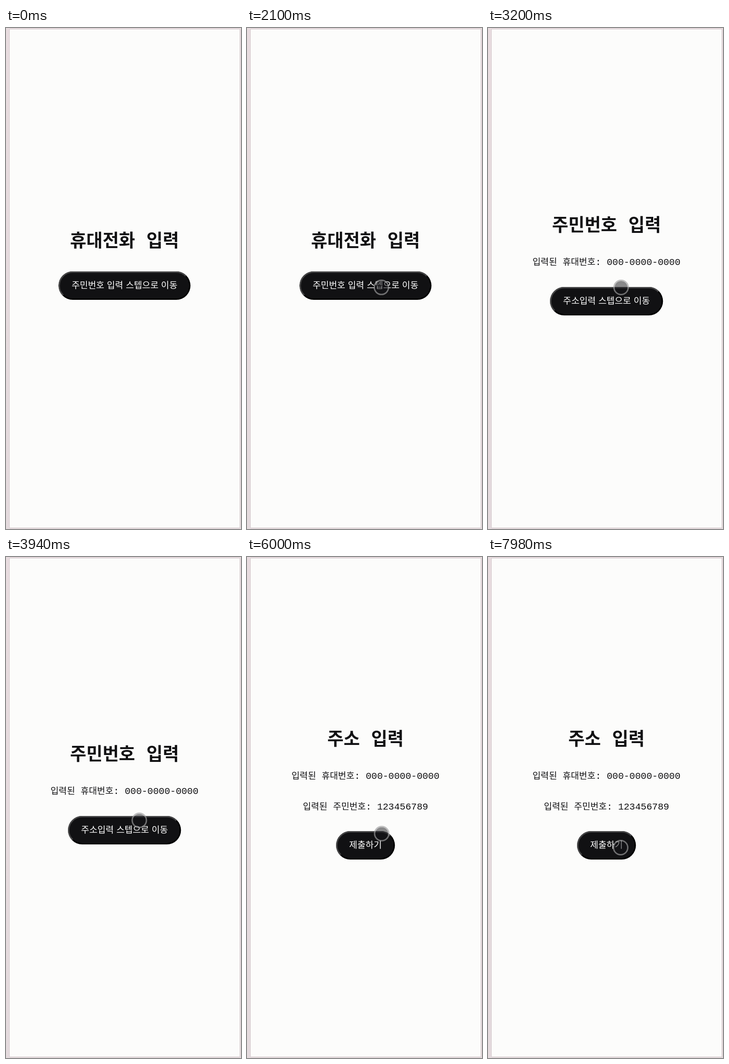
An HTML page with a canvas that plays this animation: 512x1093 px, repeating every 8000 ms.

```html
<!DOCTYPE html>
<html lang="ko">
<head>
<meta charset="utf-8">
<style>
  html, body { margin: 0; width: 100%; height: 100%; overflow: hidden; background: #e6dcde; }
  canvas { display: block; }
</style>
</head>
<body>
<canvas width="512" height="1093"></canvas>
<script>
const ctx = document.querySelector('canvas').getContext('2d');
const LOOP = 8000, CENTER = 258.2, INK = '#111113';
const HANGUL = '"Noto Sans CJK KR", "Noto Sans CJK", sans-serif';
const MONO = '"Liberation Mono", monospace';

const PHONE = ['입력된 휴대번호', ': 000-0000-0000'];
const RESIDENT = ['입력된 주민번호', ': 123456789'];
const PAGES = [
  { from: 0, title: '휴대전화 입력', lines: [], button: '주민번호 입력 스텝으로 이동' },
  { from: 3040, title: '주민번호 입력', lines: [PHONE], button: '주소입력 스텝으로 이동' },
  { from: 5560, title: '주소 입력', lines: [PHONE, RESIDENT], button: '제출하기' },
];

// Pointer stops: time, x, y
const PATH = [
  [1380, 532, 640], [2150, 290, 565], [3200, 290, 566], [3700, 290, 566],
  [4500, 292, 605], [5300, 292, 605], [6000, 293.5, 603.5], [6400, 293, 604],
  [7100, 289, 634], [8000, 289, 634],
];

// Draws runs of [text, font, wordSpacing] as one centred line
function centered(runs, y, color) {
  const setStyle = ([, font, gap]) => {
    ctx.font = font;
    ctx.wordSpacing = gap + 'px';
  };
  const widths = runs.map(run => {
    setStyle(run);
    return ctx.measureText(run[0]).width;
  });
  let x = CENTER - widths.reduce((a, b) => a + b) / 2;
  ctx.fillStyle = color;
  runs.forEach((run, i) => {
    setStyle(run);
    ctx.fillText(run[0], x, y);
    x += widths[i];
  });
}

function drawButton(label, top) {
  ctx.font = `19.35px ${HANGUL}`;
  ctx.wordSpacing = '1.3px';
  const w = ctx.measureText(label).width + 57, h = 62, x = CENTER - w / 2;
  ctx.fillStyle = '#000';
  ctx.beginPath();
  ctx.roundRect(x, top, w, h, h / 2);
  ctx.fill();
  ctx.fillStyle = INK;
  ctx.beginPath();
  ctx.roundRect(x + 3, top + 3, w - 6, h - 6, h / 2 - 3);
  ctx.fill();
  // Lit bevel along the left and top edges
  const r = h / 2 - 1.5, cy = top + h / 2;
  ctx.strokeStyle = '#454546';
  ctx.lineWidth = 3;
  ctx.beginPath();
  ctx.arc(x + h / 2, cy, r, Math.PI * 0.75, Math.PI * 1.5);
  ctx.arc(x + w - h / 2, cy, r, Math.PI * 1.5, Math.PI * 1.75);
  ctx.stroke();
  centered([[label, ctx.font, 1.3]], top + 37, '#fff');
}

function drawPage({ title, lines, button }) {
  const lift = 33.5 * lines.length;
  centered([[title, `700 38.5px ${HANGUL}`, 16]], 476.5 - lift, INK);
  lines.forEach(([label, value], i) => centered([
    [label, `19.35px ${HANGUL}`, 8],
    [value, `20.6px ${MONO}`, 0],
  ], 550.8 - lift + 67 * i, INK));
  drawButton(button, Math.round(531.2 + lift));
}

function drawPointer(t) {
  const i = PATH.findIndex(stop => stop[0] > t);
  if (i < 1) return;
  const [t0, x0, y0] = PATH[i - 1], [t1, x1, y1] = PATH[i];
  const p = (t - t0) / (t1 - t0), e = p * p * (3 - 2 * p);
  const x = x0 + (x1 - x0) * e, y = y0 + (y1 - y0) * e;
  ctx.beginPath();
  ctx.arc(x, y, 14, 0, Math.PI * 2);
  ctx.fillStyle = 'rgba(20,20,24,.5)';
  ctx.fill();
  ctx.beginPath();
  ctx.arc(x, y, 15.5, 0, Math.PI * 2);
  ctx.strokeStyle = 'rgba(160,160,162,.66)';
  ctx.lineWidth = 3;
  ctx.stroke();
}

function drawBackdrop() {
  const shade = ctx.createLinearGradient(0, 0, 0, 1093);
  shade.addColorStop(0, '#e8dcdf');
  shade.addColorStop(1, '#e4dadd');
  ctx.fillStyle = shade;
  ctx.fillRect(0, 0, 512, 1093);
  ctx.fillStyle = '#d3c8cc';
  ctx.fillRect(7, 2, 503, 1089);
  ctx.fillStyle = '#fcfcfb';
  ctx.fillRect(8, 3, 501, 1087);
}

function frame() {
  const t = performance.now() % LOOP;
  drawBackdrop();
  drawPage(PAGES.findLast(page => t >= page.from));
  drawPointer(t);
  requestAnimationFrame(frame);
}
frame();
</script>
</body>
</html>
```
